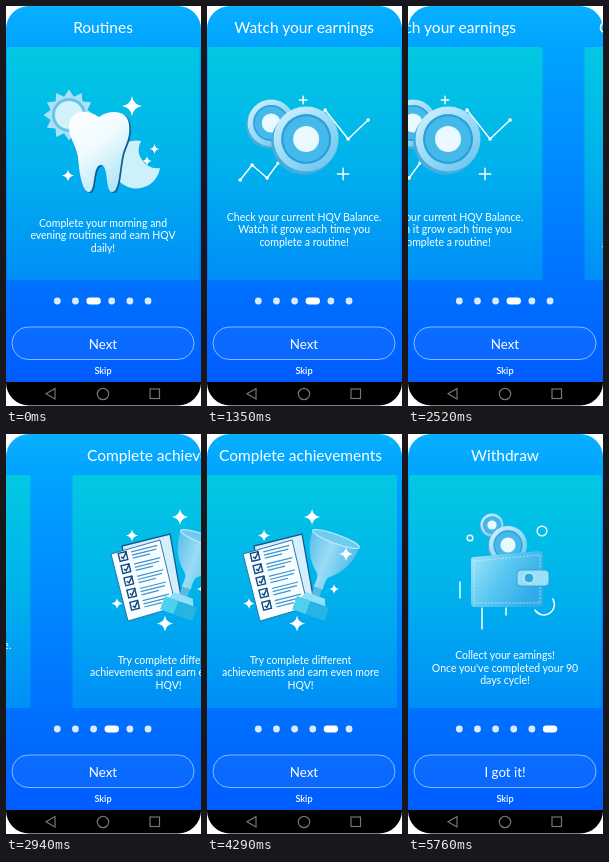
These frames come from a looping animation (195 px wide and 400 px high, 5.82 s). An HTML page:

```html
<!DOCTYPE html>
<html lang="en">
<head>
<meta charset="utf-8">
<title>Onboarding</title>
<style>
html, body { margin: 0; width: 100%; height: 100%; overflow: hidden; background: #fff; }
svg { display: block; }
text { font: 10.5px Lato, sans-serif; fill: #fff; text-anchor: middle; }
.title { font-size: 15.5px; }
#label { font-size: 13.3px; }
.skip { font-size: 9.2px; font-weight: 600; }
.line { fill: none; stroke: #f4fcff; stroke-width: 1.5; stroke-linejoin: round; stroke-linecap: round; }
.nav { fill: none; stroke: #757575; stroke-width: 1.2; }
</style>
</head>
<body>
<svg width="195" height="400" viewBox="0 0 195 400">
  <defs>
    <linearGradient id="bg" x2="0" y2="1">
      <stop stop-color="#08b0ff"/><stop offset=".12" stop-color="#00a2ff"/>
      <stop offset=".7" stop-color="#0074ff"/><stop offset="1" stop-color="#005cff"/>
    </linearGradient>
    <linearGradient id="panel" x2="0" y2="1">
      <stop stop-color="#03c8e2"/><stop offset=".5" stop-color="#00b2ec"/><stop offset="1" stop-color="#008ef8"/>
    </linearGradient>
    <linearGradient id="ice" x2=".6" y2="1">
      <stop stop-color="#fff"/><stop offset=".5" stop-color="#f0fbff"/><stop offset="1" stop-color="#b4e6f7"/>
    </linearGradient>
    <linearGradient id="glass" x2=".8" y2="1">
      <stop stop-color="#d5f4ff"/><stop offset="1" stop-color="#6cc6ee"/>
    </linearGradient>
    <linearGradient id="cup" x2="1">
      <stop stop-color="#5cc0ea"/><stop offset=".45" stop-color="#9adcf5"/><stop offset="1" stop-color="#4fbdea"/>
    </linearGradient>
    <linearGradient id="wallet" x2="1" y2=".5">
      <stop stop-color="#a5e6fb"/><stop offset=".5" stop-color="#5cc8f2"/><stop offset="1" stop-color="#2fabe6"/>
    </linearGradient>
    <clipPath id="phone"><rect width="195" height="399.5" rx="23"/></clipPath>
  </defs>
  <g clip-path="url(#phone)">
    <rect width="195" height="377" fill="url(#bg)"/>
    <g id="pages"></g>
    <g id="dots" fill="#fff"></g>
    <rect x="6" y="321" width="182" height="32.5" rx="16.2" fill="#fff" fill-opacity=".04" stroke="#a9d0ff" stroke-width=".8"/>
    <text id="label" x="97" y="342.5"></text>
    <text class="skip" x="97" y="368">Skip</text>
    <rect y="376" width="195" height="24"/>
    <path class="nav" d="M49 382.5V393L40 387.7Z"/>
    <circle class="nav" cx="97" cy="388" r="5.7"/>
    <rect class="nav" x="144" y="383" width="9.5" height="9.5"/>
  </g>
</svg>
<script>
const $ = id => document.getElementById(id);
const LOOP = 5820, PITCH = 234.5, RELEASE = 740, SETTLE = 240;
const SWIPES = [403, 2260, 4247];

const path = (d, fill, extra = '') => `<path d="${d}" fill="${fill}" ${extra}/>`;
const disc = (x, y, r, fill, extra = '') => `<circle cx="${x}" cy="${y}" r="${r}" fill="${fill}" ${extra}/>`;
const ring = (x, y, r) => `<circle class="line" cx="${x}" cy="${y}" r="${r}"/>`;
const line = d => `<path class="line" d="${d}"/>`;
const range = (n, f) => Array.from({length: n}, (_, i) => f(i)).join('');

const star = (x, y, r) => path(`M${x} ${y - r}Q${x + r * .14} ${y - r * .14} ${x + r} ${y}` +
  `Q${x + r * .14} ${y + r * .14} ${x} ${y + r}Q${x - r * .14} ${y + r * .14} ${x - r} ${y}` +
  `Q${x - r * .14} ${y - r * .14} ${x} ${y - r}Z`, '#fff');
const stars = list => list.map(s => star(...s)).join('');
const plus = (x, y, r) => line(`M${x - r} ${y}h${2 * r}M${x} ${y - r}v${2 * r}`);
const chart = points => line('M' + points.join('L')) +
  points.map(([x, y]) => disc(x, y, 1.8, '#fff')).join('');
const coin = (x, y, r) => disc(x - r * .07, y + r * .1, r, '#43addf') +
  disc(x, y, r, 'url(#glass)') + disc(x, y, r * .77, '#2a9fdd') +
  disc(x, y, r * .7, '#46b9eb') + disc(x, y, r * .4, '#e9f9ff');

function sun(x, y) {
  const d = Array.from({length: 24}, (_, i) => {
    const a = i * Math.PI / 12, r = i % 2 ? 19 : 25.5;
    return [x + r * Math.cos(a), y + r * Math.sin(a)];
  }).join('L');
  return path(`M${d}Z`, '#a9e2f7') + disc(x, y, 17, '#6cc3e8') + disc(x, y, 14, '#d2f2fc');
}

function tooth() {
  const shape = 'M93 111C82 103 65 103 63 119C62 131 70 138 72 151C73 165 76 186 83 186' +
    'C90 186 86 159 95 159C103 159 99 186 106 186C113 186 113 167 116 151' +
    'C118 140 125 133 123 118C121 103 103 104 93 111Z';
  return sun(63, 109) +
    path('M135 135A24 24 0 1 0 154 162A18.5 18.5 0 0 1 135 135Z', '#cdf1fb') +
    path(shape, '#0d5f98', 'transform="translate(1.6 1)"') + path(shape, 'url(#ice)') +
    stars([[126, 100, 10], [148.5, 143, 5], [141, 155, 5], [62, 169.5, 6]]);
}

const earnings = () => chart([[33, 174], [45, 159], [60, 172], [71, 157]]) +
  chart([[105, 127], [118, 104], [141, 133], [161, 114]]) +
  coin(64, 117, 23.5) + coin(99, 133, 32.5) + plus(96, 94, 3.7) + plus(136, 168, 5.7);

const checks = () => range(5, i => {
  const y = 122.5 + i * 12.2, x = 48 + i * 2.9;
  return `<g transform="translate(${x} ${y}) rotate(-14)" fill="none" stroke="#124c83">` +
    '<rect x="-4" y="-4" width="8" height="8" stroke-width="1.4"/>' +
    '<path d="M-2 0L-.2 2L4.5-4" stroke-width="1.5"/>' +
    '<path d="M9-2.5h27M9 .8h25M9 4h18" stroke="#3f95cf" stroke-width="1.2"/></g>';
});

const trophy = () => '<g transform="translate(129 105) rotate(20)">' +
  path('M-5 34H5L4 62H-4Z', '#58b9e4') +
  path('M-25 0H25Q24 24 7 38Q3 41 5 52H-5Q-3 41-7 38Q-24 24-25 0Z', 'url(#cup)') +
  '<ellipse rx="25" ry="4.5" fill="#6fcbf0" stroke="#c4eefc"/>' +
  path('M-10 60H10L13 67H-13Z', '#8fe0f7') + path('M-17 67H17V81H-17Z', '#25b4e4') +
  path('M-17 67H-3V81H-17Z', '#4fd0ef') + '</g>';

// Drawn at the pose seen just after a swipe begins, hence the small shift.
const achievements = () => '<g transform="translate(3.5)">' +
  path('M47 112L95 100L107 168L60 182Z', '#d3effb', 'stroke="#145a95" stroke-width="1.3"') +
  path('M36 120L85 106L101 173L53 187Z', '#f8fdff', 'stroke="#1c6aa8" stroke-width=".9"') +
  checks() + trophy() +
  stars([[105, 83, 8], [57, 101.5, 6], [90, 189.5, 8], [139, 120, 7], [42, 169.5, 5.5], [127, 155, 5]]) + '</g>';

const withdraw = () => coin(84, 91, 11.5) + coin(100, 111, 19) +
  path('M66 123L131 117Q135 117 135 121V169Q135 173 131 173H67Q63 173 63 169V126Q63 123 66 123Z', 'url(#wallet)') +
  path('M66 127L132 121V169H66Z', 'none', 'stroke="#c9f1ff" stroke-width=".7" stroke-dasharray="2 1.5"') +
  '<rect x="109" y="136" width="32" height="16" rx="4" fill="#9be0f8" stroke="#2497d2" stroke-width=".8"/>' +
  disc(121, 144, 5, '#2fa9e2', 'stroke="#d9f6ff"') +
  ring(134, 97, 4.8) + ring(62, 104, 2.8) +
  line('M144.8 165A10 10 0 1 1 127 176M52 148v16M74 174v21M98 174v7');

const PAGES = [
  ['Routines', tooth, 220.5, ['Complete your morning and', 'evening routines and earn HQV', 'daily!']],
  ['Watch your earnings', earnings, 214.5, ['Check your current HQV Balance.', 'Watch it grow each time you', 'complete a routine!']],
  ['Complete achievements', achievements, 229.5, ['Try complete different', 'achievements and earn even more', 'HQV!']],
  ['Withdraw', withdraw, 225, ['Collect your earnings!', "Once you've completed your 90", 'days cycle!']]
];

$('pages').innerHTML = PAGES.map(([title, art, y, lines], i) =>
  `<g transform="translate(${i * PITCH})">` +
  '<rect x="1" y="41" width="192.5" height="233" rx="1.5" fill="url(#panel)"/>' +
  `<text class="title" x="97" y="26.5">${title}</text>${art()}` +
  lines.map((t, k) => `<text x="97" y="${y + k * 12.5}">${t}</text>`).join('') + '</g>').join('');
$('dots').innerHTML = range(6, () => '<rect rx="3.4" height="6.8" y="291.6"/>');

// A finger drag at steady speed, then a quick settle after release.
function swipe(u) {
  if (u <= 0) return 0;
  if (u < 70) return .262 * u * u / 140;
  if (u < RELEASE) return .262 * (u - 35);
  const left = 1 - Math.min(1, (u - RELEASE) / SETTLE);
  return PITCH - (PITCH - .262 * (RELEASE - 35)) * left ** 3;
}

function draw(now) {
  const t = Math.floor(now % LOOP / 30) * 30;
  const scroll = SWIPES.reduce((sum, start) => sum + swipe(t - start), 0);
  const page = SWIPES.filter(start => t >= start + RELEASE).length;
  $('pages').setAttribute('transform', `translate(${-scroll})`);
  [...$('dots').children].forEach((dot, i) => {
    const active = i === page + 2, w = active ? 14.4 : 6.8;
    dot.setAttribute('x', 51.3 + i * 18.15 - w / 2);
    dot.setAttribute('width', w);
    dot.setAttribute('opacity', active ? 1 : .85);
  });
  $('label').textContent = page === 3 ? 'I got it!' : 'Next';
}

const begin = performance.now();
function tick() {
  draw(performance.now() - begin);
  requestAnimationFrame(tick);
}
tick();
</script>
</body>
</html>
```
